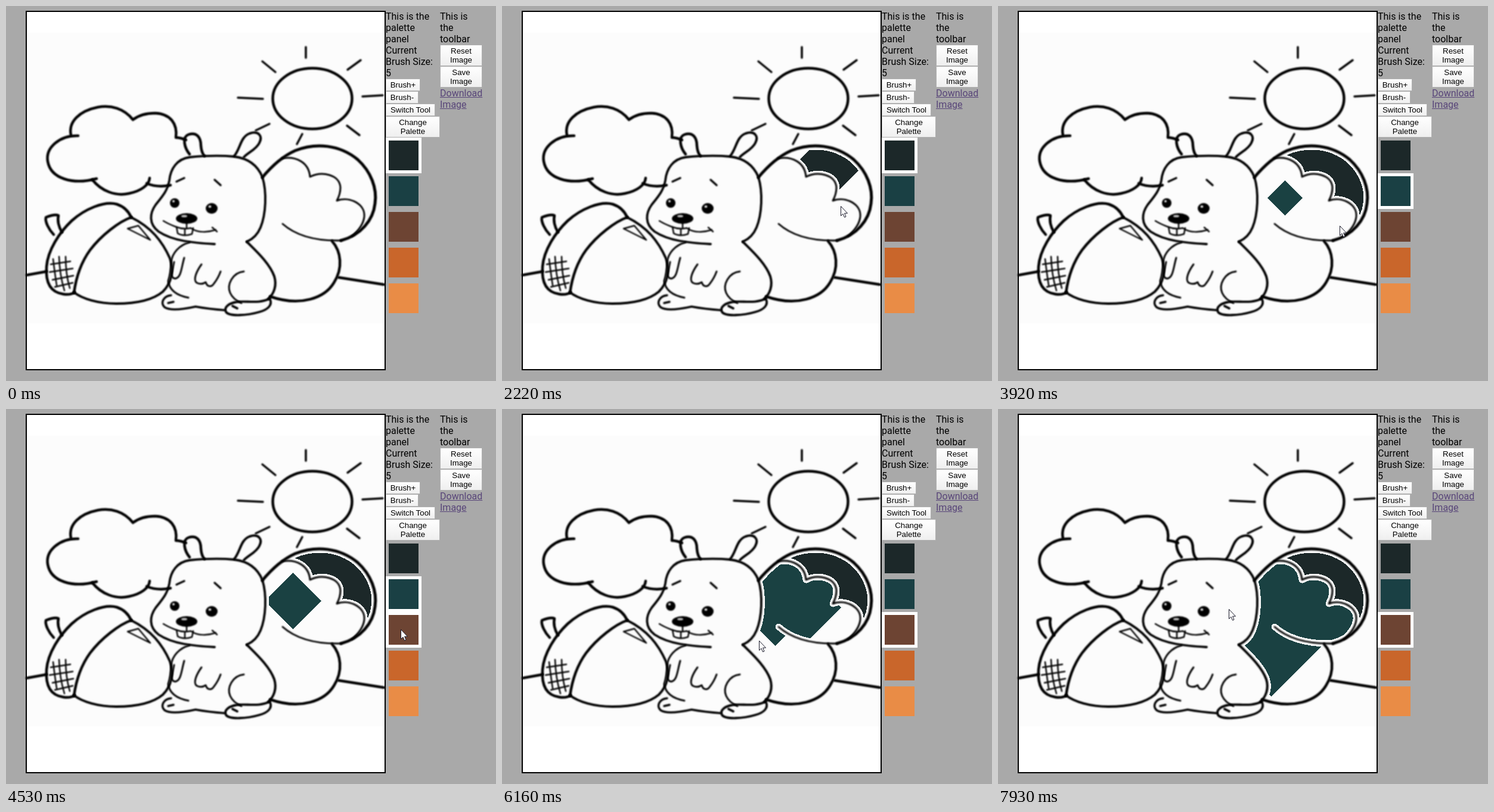
An HTML page with a canvas for the animation above (8000 ms loop, 822 by 630 pixels).

```html
<!DOCTYPE html>
<html lang="en">
<head>
<meta charset="utf-8">
<title>Colouring page</title>
<style>
  html, body { margin: 0; width: 100%; height: 100%; overflow: hidden; background: #a9a9a9; }
  body { font: 16px/19px Roboto, sans-serif; color: #000; }
  body > * { position: absolute; }
  canvas { left: 0; top: 0; }
  p { margin: 0; top: 8px; white-space: pre; }
  .link { top: 137px; color: #584579; text-decoration: underline; }
  .btn {
    box-sizing: border-box; display: flex; align-items: center; justify-content: center;
    border: 1px solid #b0b0b0; background: linear-gradient(#fff, #efefef);
    font: 13.333px/15px "Liberation Sans", Arial, sans-serif; text-align: center;
  }
  .swatch { left: 637px; width: 50px; height: 50px; border: 5px solid transparent; background-clip: padding-box; }
  .swatch.on { border-color: #fff; }
  #cursor { left: 0; top: 0; overflow: visible; }
</style>
</head>
<body>
<canvas id="stage" width="822" height="630"></canvas>
<p style="left:637px">This is the
palette
panel
Current
Brush Size:
5</p>
<p style="left:728px">This is
the
toolbar</p>
<p class="link" style="left:728px">Download
Image</p>
<div class="btn" style="left:637px;top:122px;width:58px;height:21px">Brush+</div>
<div class="btn" style="left:637px;top:143px;width:55px;height:21px">Brush-</div>
<div class="btn" style="left:637px;top:164px;width:83px;height:21px">Switch Tool</div>
<div class="btn" style="left:637px;top:185px;width:91px;height:36px">Change<br>Palette</div>
<div class="btn" style="left:728px;top:65px;width:71px;height:36px">Reset<br>Image</div>
<div class="btn" style="left:728px;top:101px;width:71px;height:36px">Save<br>Image</div>
<svg id="cursor" width="12" height="20">
  <path d="M.5 .5V16.5L4 13.2 6.5 19 9 18 6.6 12.2H11.5Z" fill="#fff" stroke="#1a1a2a"/>
</svg>
<script>
const LOOP = 8000, STEP = 77.2;
const W = 822, H = 630;
const DARK = '#1c2829', TEAL = '#1a4142';

// Each stroke: [line width, path]
const sun = [
  [4.5, 'M447.5 155.5a66.5 51 0 1 0 133 0a66.5 51 0 1 0 -133 0'],
  [3.5, 'M503 69V87M430 93L452 111M595 91L573 107M389 154L431 156M598 152L632 150M442 198L419 209M497 215L488 232M572 201L593 217'],
];
const cloud = [
  [4.5, 'M302 225Q292 221 285 221C288 198 276 181 250 180C235 180 222 184 213 191C198 172 176 166 154 170C124 176 104 194 109 217'],
  [4.5, 'M121 218C90 217 66 238 70 261C75 290 112 301 152 290'],
  [4.5, 'M145 292C160 311 184 320 206 315C226 311 240 301 241 289M236 298C248 303 262 304 276 301'],
];
const acorn = [
  [4.5, 'M80 384C72 376 65 362 67 355C72 353 82 349 88 352C86 360 88 371 94 380'],
  [4.5, 'M115 481Q108 486 96 484C75 481 66 465 68 438C70 410 90 380 110 361C132 341 165 327 186 333C198 337 206 346 210 355'],
  [4.5, 'M210 355C190 362 160 385 141 410C125 432 117 460 114 482'],
  [4, 'M210 355C244 372 262 395 275 424C282 444 278 465 263 480C245 495 215 500 185 500C155 500 128 492 114 481'],
  [2.5, 'M204 374L222 369L242 393Z'],
  [2.5, 'M79 425Q82 450 85 469M89 421Q90 452 98 478M100 421Q100 450 107 474M75 434L108 429M73 447L112 441M78 460L113 453M82 472L112 465'],
];
const head = [
  [4.5, 'M308 249C299 238 295 220 306 216C320 211 327 221 327 235Q328 247 333 252'],
  [4, 'M383 252C394 238 393 220 409 214C424 209 431 219 425 230C420 241 406 246 399 254'],
  [3.8, 'M350 400C315 398 280 395 256 379C239 366 241 348 251 334C263 319 271 310 274 293C276 273 287 257 308 254Q350 250 383 253C407 256 422 268 430 287C438 313 436 350 427 372Q420 389 404 396'],
  [3.5, 'M286 295L299 289M350 292L360 301'],
  [2.5, 'M264 361Q272 366 285 371Q298 376 310 373C322 382 340 380 352 376M346 372L354 379M286 371L288 382Q298 388 312 383L314 373M300 374V384M303 364V372'],
];
const body = [
  [4, 'M404 396C420 412 442 432 450 454C455 470 449 484 440 492'],
  [3, 'M399 446C380 448 370 468 376 482Q381 493 395 499'],
  [3.8, 'M443 493C447 502 440 510 425 514C405 520 375 522 369 514C365 506 374 499 388 497C405 495 425 501 443 491M380 504L388 508'],
  [3.5, 'M277 486C265 487 258 498 266 506C276 513 300 509 318 505Q340 509 367 511M272 499L281 497'],
  [3, 'M308 397C290 402 279 415 277 430Q276 450 272 462C274 477 285 486 306 490'],
  [3, 'M282 430L278 450Q277 457 284 458C294 456 294 440 299 423'],
  [3, 'M328 434C320 445 313 460 320 465Q328 469 335 464C337 471 344 474 349 466Q356 457 360 446'],
];
const tail = [
  [5, 'M430 288C445 270 465 252 485 243C520 229 560 233 590 258C612 278 623 306 619 332C616 360 595 385 562 394'],
  [3, 'M464 366C490 389 525 395 562 394'],
  [3, 'M463 256C486 252 508 262 510 287C530 277 560 283 561 305Q561 316 555 327C577 319 603 333 601 354Q599 371 580 387'],
  [4.5, 'M547 395C562 412 566 440 550 465C535 490 495 506 443 488'],
];
const ground = [[4.5, 'M558 456L634 468M35 452L68 446']];
const lineArt = [sun, cloud, acorn, head, body, tail, ground].flat();

// Timed keys: [ms, ...values]
const cursorKeys = [
  [200, 685, 596], [600, 592, 390], [900, 540, 265], [990, 533, 290], [1130, 524, 304], [1450, 541, 274],
  [1610, 541, 274], [2300, 572, 345], [2450, 572, 345], [2690, 662, 302], [2900, 662, 302],
  [3210, 558, 319], [3460, 481, 322], [3650, 481, 322], [4060, 623, 394], [4450, 662, 370],
  [4920, 662, 370], [5550, 461, 426], [5840, 461, 426], [6600, 388, 337], [6700, 387, 336],
];
const fills = [
  { color: DARK, seed: [542, 273], reach: [[1530, 0], [1610, 12], [1700, 20], [2000, 42], [2370, 70], [2650, 150]] },
  { color: TEAL, seed: [481, 322], reach: [[3473, 0], [3530, 11], [3630, 18], [3800, 26], [4070, 35], [4530, 47],
    [4920, 57], [5610, 76], [6770, 124], [7480, 153], [7930, 183]] },
];
const selected = [[0, 2790], [2710, 4570], [4500, LOOP]];

const ctx = stage.getContext('2d', { willReadFrequently: true });

function strokeArt(extra) {
  ctx.lineCap = ctx.lineJoin = 'round';
  for (const [width, path] of lineArt) {
    ctx.lineWidth = width + extra;
    ctx.stroke(new Path2D(path));
  }
}

function rect(color, x, y, w, h) {
  ctx.fillStyle = color;
  ctx.fillRect(x, y, w, h);
}

function ellipse(color, x, y, rx, ry) {
  ctx.fillStyle = color;
  ctx.beginPath();
  ctx.ellipse(x, y, rx, ry, 0, 0, 7);
  ctx.fill();
}

function drawPage() {
  rect('#a9a9a9', 0, 0, W, H);
  rect('#000', 33, 8, 604, 604);
  rect('#fff', 35, 10, 600, 600);
  rect('#fcfcfc', 35, 45, 599, 488);
  ctx.filter = 'blur(.8px)';
  strokeArt(0);
  ellipse('#000', 283, 331, 8, 8);
  ellipse('#000', 345, 340, 10, 9);
  ellipse('#000', 303, 357, 18, 9);
  ellipse('#ddd', 281, 328, 2, 2);
  ellipse('#ddd', 342, 337, 2.5, 2);
  ellipse('#bbb', 299, 353, 5, 2);
  ctx.filter = 'none';
}

const readPixels = () => new Uint32Array(ctx.getImageData(0, 0, W, H).data.buffer);

// Breadth-first walk: pixels in order with their step distance from the seed
function flood(open, [x, y]) {
  const order = [y * W + x];
  const dist = new Int32Array(W * H).fill(-1);
  dist[order[0]] = 0;
  for (let i = 0; i < order.length; i++) {
    const p = order[i];
    for (const q of [p + 1, p - 1, p + W, p - W]) {
      if (open[q] && dist[q] < 0) {
        dist[q] = dist[p] + 1;
        order.push(q);
      }
    }
  }
  return { order, dist };
}

// Widened lines keep the paint a little away from the drawing
rect('#fff', 35, 10, 600, 600);
strokeArt(8);
const open = readPixels().map(v => (v >>> 24) > 200 && (v & 255) > 128 ? 1 : 0);
for (const f of fills) {
  Object.assign(f, flood(open, f.seed));
  f.rgba = 0xff000000 | parseInt(f.color.slice(1).match(/../g).reverse().join(''), 16);
}
drawPage();
const page = readPixels();
const frame = new ImageData(W, H);
const pixels = new Uint32Array(frame.data.buffer);

const swatches = [DARK, '#1a4044', '#6d4433', '#c9662b', '#e98c46'].map((color, i) => {
  const el = document.createElement('div');
  el.className = 'swatch';
  el.style.backgroundColor = color;
  el.style.top = 221 + 60 * i + 'px';
  cursor.before(el);
  return el;
});

function at(keys, t) {
  const i = keys.findIndex(k => k[0] > t);
  if (i < 0) return keys[keys.length - 1].slice(1);
  if (i === 0) return keys[0].slice(1);
  const a = keys[i - 1], b = keys[i];
  const u = (t - a[0]) / (b[0] - a[0]);
  return a.slice(1).map((v, j) => v + (b[j + 1] - v) * u);
}

function render(t) {
  pixels.set(page);
  for (const { order, dist, reach, rgba } of fills) {
    if (t < reach[0][0]) continue;
    const [r] = at(reach, t);
    for (let i = 0; i < order.length && dist[order[i]] <= r; i++) pixels[order[i]] = rgba;
  }
  ctx.putImageData(frame, 0, 0);

  const [x, y] = at(cursorKeys, t).map(Math.round);
  cursor.style.visibility = t < 200 ? 'hidden' : 'visible';
  cursor.style.transform = `translate(${x}px, ${y}px)`;
  selected.forEach(([from, to], i) => swatches[i].classList.toggle('on', t >= from && t < to));
}

// The screen refreshes in fixed steps
function tick() {
  const t = performance.now() % LOOP;
  render(Math.max(0, 7930 + STEP * Math.floor((t + 12 - 7930) / STEP)));
  requestAnimationFrame(tick);
}
tick();
</script>
</body>
</html>
```
